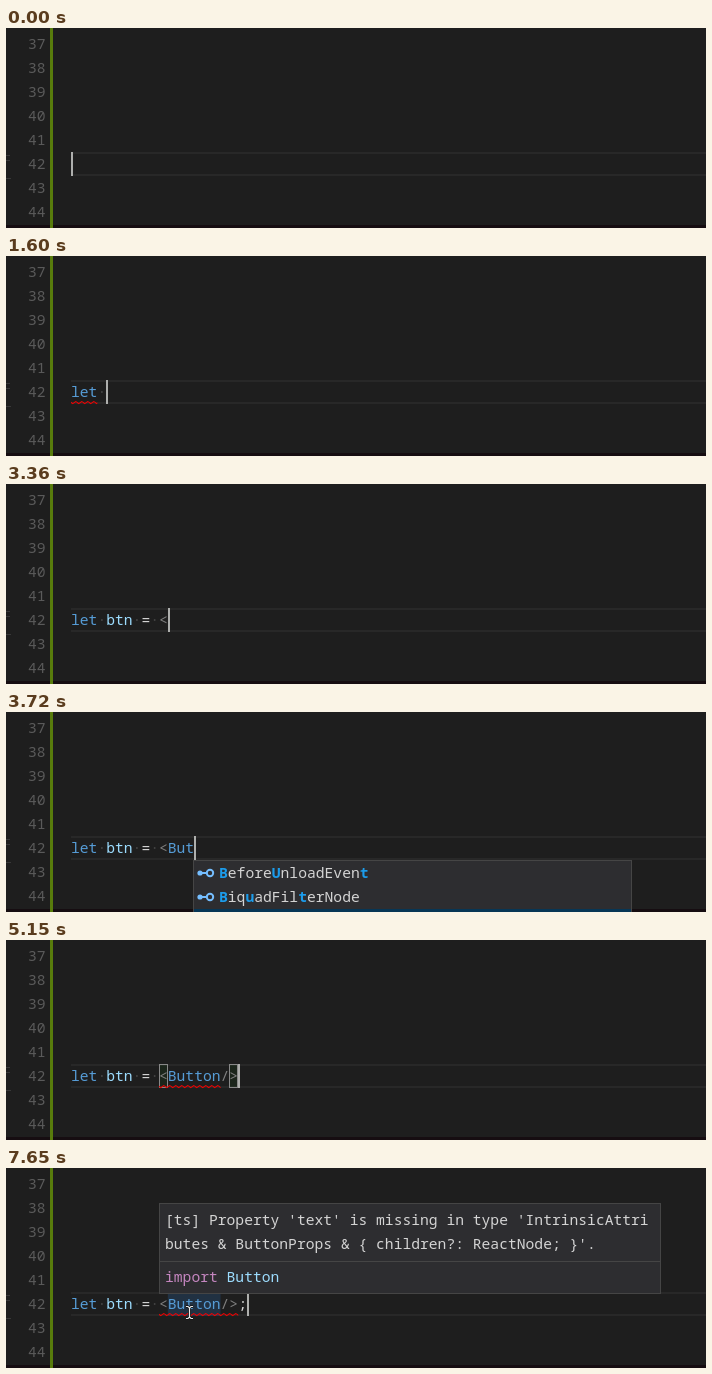
These frames come from a looping animation (700x200 px, 8000 ms). An HTML page:

```html
<!DOCTYPE html>
<html lang="en">
<head>
<meta charset="utf-8">
<title>Editor typing</title>
<style>
  html, body { margin: 0; width: 100%; height: 100%; overflow: hidden; background: #1e1e1e; }
  svg { display: block; width: 700px; height: 200px; }
  text { font: 14.667px "Noto Sans Mono", "DejaVu Sans Mono", monospace; white-space: pre; fill: #d4d4d4; }
  .num { fill: #5a5a5a; font-weight: 300; text-anchor: end; }
  .kw { fill: #569cd6; }
  .var { fill: #9cdcfe; }
  .op { fill: #d4d4d4; }
  .tag { fill: #808080; }
  .ws { fill: #454545; }
  .imp { fill: #c586c0; }
  .hit { fill: #1c9ceb; font-weight: 700; }
  .box { fill: #2d2d30; stroke: #454545; }
  .bracket { fill: #0064001a; stroke: #888; }
  .icon { fill: none; stroke: #75beff; stroke-width: 2; }
</style>
</head>
<body>
<svg viewBox="0 0 700 200">
  <defs>
    <pattern id="wave" width="6" height="4" patternUnits="userSpaceOnUse">
      <path d="M0 1.3 1.75 2.6 4.75.6 6 1.3" fill="none" stroke="#f00000" stroke-width="1.1"/>
    </pattern>
  </defs>
  <rect width="700" height="200" fill="#1e1e1e"/>
  <path d="M65 125H700M65 147H700" stroke="#282828" stroke-width="2"/>
  <path d="M0 127.5H4M0 132.5H4M0 150.5H5" stroke="#383838"/>
  <rect y="197" width="700" height="3" fill="#160d11"/>
  <rect x="44" width="3" height="200" fill="#587c0c"/>
  <g id="numbers"></g>
  <g id="scene"></g>
</svg>
<script>
const LOOP = 8000, LEFT = 65, CHAR = 8.8;
const TOKENS = [
  ['kw', 'let'], ['ws', '·'], ['var', 'btn'], ['ws', '·'], ['op', '='], ['ws', '·'],
  ['tag', '<'], ['kw', 'Button'], ['tag', '/>'], ['op', ';']
];
const popup = (at, query, items, selected = 0) => ({ popup: { at, query, items, selected } });
const closed = { popup: null };
const FILTERED = ['BeforeUnloadEvent', 'BiquadFilterNode', 'Button'];
const BUTTONS = ['Button', 'HTMLButtonElement'];

// Each step changes only the listed parts of the state.
const STEPS = [
  [0, { typed: 0, caret: true }],
  [530, { typed: 1 }],
  [700, { typed: 2 }],
  [880, popup(2, 'le', ['let', 'length'])],
  [1240, { typed: 3 }],
  [1420, popup(3, 'let', ['let', 'completed'])],
  [1600, { typed: 4, error: [0, 3], ...closed }],
  [1960, { typed: 5 }],
  [2130, { typed: 6, error: null, ...popup(6, 'bt', ['btoa', 'ObjectConstructor']) }],
  [2310, { typed: 7, ...popup(7, 'btn', ['ObjectConstructor', 'SubmitEvent']) }],
  [2480, { typed: 8, ...closed }],
  [2650, { typed: 9 }],
  [2830, { typed: 10 }],
  [3190, { typed: 11 }],
  [3370, { typed: 12 }],
  [3550, { typed: 13, ...popup(13, 'Bu', FILTERED, 2) }],
  [3720, { typed: 14, ...popup(14, 'But', FILTERED, 2) }],
  [3900, { typed: 15, ...popup(15, 'Butt', BUTTONS) }],
  [4080, { typed: 16, ...popup(16, 'Butto', BUTTONS) }],
  [4260, { error: [11, 16] }],
  [4610, { typed: 17 }],
  [4790, { typed: 18, ...closed }],
  [4970, { typed: 19, brackets: true }],
  [5150, { error: [10, 17] }],
  [5510, { typed: 20, brackets: false }],
  [5680, { error: [10, 19] }],
  [6220, { caret: false }],
  [6750, { caret: true, mouse: [155, 188] }],
  [6930, { mouse: [174, 161] }],
  [7110, { caret: false, mouse: [183, 144] }],
  [7650, { caret: true, tip: true }]
];

const column = n => LEFT + CHAR * n;
const span = (cls, s) => `<tspan class="${cls}">${s.replace(/</g, '&lt;')}</tspan>`;
const text = (x, y, body) => `<text x="${x}" y="${y}">${body}</text>`;
const rect = (x, y, w, h, attrs) => `<rect x="${x}" y="${y}" width="${w}" height="${h}" ${attrs}/>`;

function code(typed) {
  let left = typed, body = '';
  for (const [cls, word] of TOKENS) {
    const part = word.slice(0, left);
    left -= part.length;
    if (part) body += span(typed < 3 ? 'var' : cls, part);
  }
  return text(LEFT, 141, body);
}

function squiggle([from, to]) {
  return `<g transform="translate(${Math.round(column(from))} 145)">` +
    rect(0, 0, (to - from) * CHAR, 3.5, 'fill="url(#wave)"') + '</g>';
}

// Marks the letters of the query in the order they occur.
function marked(name, query) {
  let i = 0;
  return [...name].map(c =>
    i < query.length && c.toLowerCase() === query[i].toLowerCase() ? (i++, span('hit', c)) : c
  ).join('');
}

function list({ at, query, items, selected }) {
  const x = Math.round(column(at)) - 1;
  const rows = items.map((name, i) => {
    const y = 161 + 24 * i;
    return (i === selected ? rect(x + 1, y - 12, 437, 24, 'fill="#073655"') : '') +
      `<circle cx="${x + 7}" cy="${y}" r="2.6" fill="#75beff"/>` +
      `<path class="icon" d="M${x + 8} ${y}h6"/><circle class="icon" cx="${x + 17}" cy="${y}" r="3.2"/>` +
      text(x + 26, y + 5, marked(name, query));
  });
  return rect(x + .5, 148.5, 438, 80, 'class="box"') + rows.join('');
}

function tooltip() {
  return rect(153.5, 35.5, 501, 90, 'class="box"') +
    '<path d="M154 93.5H654" stroke="#454545"/>' +
    text(159, 57, "[ts] Property 'text' is missing in type 'IntrinsicAttri") +
    text(159, 81, "butes &amp; ButtonProps &amp; { children?: ReactNode; }'.") +
    text(159, 114, span('imp', 'import') + ' ' + span('var', 'Button'));
}

function pointer([x, y]) {
  const d = `M${x - 3} ${y - 5.5}h2l1.5 1.5 1.5 -1.5h2M${x + .5} ${y - 4}v9M${x - 3} ${y + 6.5}h2l1.5 -1.5 1.5 1.5h2`;
  return `<path d="${d}" fill="none" stroke="#111" stroke-width="2.6"/>` +
    `<path d="${d}" fill="none" stroke="#e8e8e8" stroke-width="1.2"/>`;
}

function render(s) {
  const bracket = n => rect(Math.round(column(n)) + .5, 124.5, 8, 23, 'class="bracket"');
  return (s.tip ? rect(column(11), 124, CHAR * 6, 24, 'fill="#264f7866"') : '') +
    (s.brackets ? bracket(10) + bracket(18) : '') +
    code(s.typed) +
    (s.error ? squiggle(s.error) : '') +
    (s.popup ? list(s.popup) : '') +
    (s.caret ? rect(Math.round(column(s.typed)), 124, 2, 24, 'fill="#aeafad"') : '') +
    (s.tip ? tooltip() : '') +
    (s.mouse ? pointer(s.mouse) : '');
}

document.getElementById('numbers').innerHTML = Array.from({ length: 8 }, (_, i) =>
  `<text class="num" x="39.5" y="${21 + 24 * i}">${37 + i}</text>`).join('');

const scene = document.getElementById('scene');
const start = performance.now();
let shown = -1;

function frame() {
  const t = Math.max(0, performance.now() - start) % LOOP;
  const now = STEPS.filter(([at]) => at <= t);
  if (now.length !== shown) {
    shown = now.length;
    scene.innerHTML = render(Object.assign({}, ...now.map(([, change]) => change)));
  }
  requestAnimationFrame(frame);
}
frame();
</script>
</body>
</html>
```
